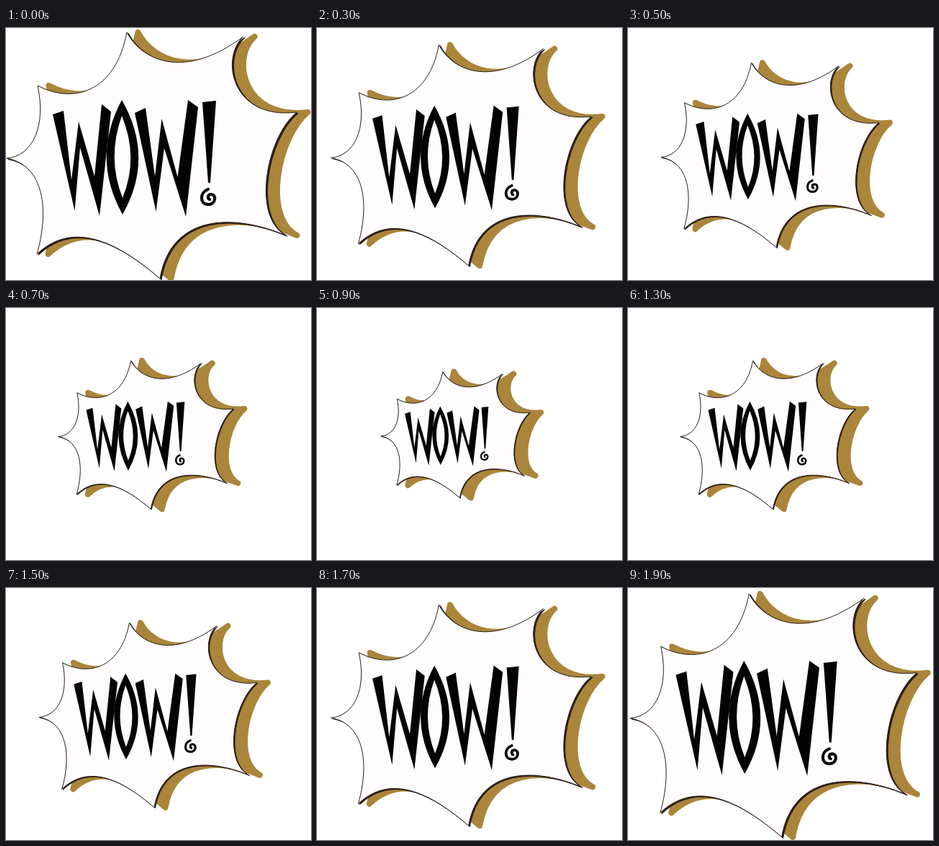
Animation of 424 by 350 pixels, one loop 2000 ms. Source, as an HTML page with a canvas:

```html
<!DOCTYPE html>
<html lang="en">
<head>
<meta charset="utf-8">
<title>Wow burst</title>
<style>
  html, body { margin: 0; width: 100%; height: 100%; overflow: hidden; background: #fff; }
  canvas { display: block; }
</style>
</head>
<body>
<canvas id="stage" width="424" height="350"></canvas>
<script>
const ctx = document.getElementById('stage').getContext('2d');
const STEP = 100, STEPS = 20;
const CENTER = { x: 182, y: 175 };
const GOLD = '#aa853a', INK = '#050203', EDGE = '#2a1e17', PAPER = '#fffcfd';

const burst = new Path2D(`M1 181
  C38 178 56 135 44 80
  C93 106 152 90 168 6
  C188 44 246 74 330 12
  C298 40 312 128 404 117
  C362 152 341 262 389 288
  C318 258 230 257 214 348
  C165 306 98 262 43 314
  C60 255 54 190 1 181Z`);

const letters = new Path2D(`
  M65 120 L80 115 L91 211 L101 130 L123 206 L133 106 L146 116
  L130 261 L103 166 L95.5 254Z
  M161 100 Q207 180 162 259 Q118 180 161 100Z
  M161 122 Q140 180 162 236 Q185 180 161 122Z
  M179 118 L194 111 L207 206 L216.5 126 L238.5 207 L253 100 L267 110
  L250 262 L220 167 L208.5 255Z
  M273 103 L292 101 L284 215 L281 215Z`);

const swirl = new Path2D(`M281 224 C269 228 269 245 281 245
  C292 245 293 231 285 231 C280 231 280 237 283 238`);

// Applies the pulse scale plus an offset in screen pixels.
function place(scale, dx = 0, dy = 0) {
  ctx.setTransform(scale, 0, 0, scale,
    CENTER.x * (1 - scale) + dx, CENTER.y * (1 - scale) + dy);
}

function paint(path, fill, stroke, width) {
  ctx.fillStyle = fill;
  ctx.fill(path);
  ctx.strokeStyle = stroke;
  ctx.lineWidth = width;
  ctx.stroke(path);
}

function draw(time) {
  const step = Math.floor(time / STEP) % STEPS;
  const scale = 0.75 + 0.25 * Math.cos(2 * Math.PI * step / STEPS);

  ctx.setTransform(1, 0, 0, 1, 0, 0);
  ctx.fillStyle = '#fff';
  ctx.fillRect(0, 0, 424, 350);

  // The shadow keeps its offset and rounded rim at every size.
  ctx.lineJoin = ctx.lineCap = 'round';
  place(scale, 15.5, 0);
  paint(burst, GOLD, GOLD, 8 / scale);

  // A slight shift makes the right and lower edges heavier.
  ctx.lineJoin = 'miter';
  ctx.miterLimit = 3;
  place(scale, 2 * scale, 1.3 * scale);
  paint(burst, EDGE, EDGE, 1.2);
  place(scale);
  paint(burst, PAPER, EDGE, 1 / scale);

  ctx.fillStyle = INK;
  ctx.fill(letters, 'evenodd');
  ctx.strokeStyle = INK;
  ctx.lineWidth = 4.2;
  ctx.stroke(swirl);
}

const start = performance.now();
function tick() {
  draw(performance.now() - start);
  requestAnimationFrame(tick);
}
tick();
</script>
</body>
</html>
```
